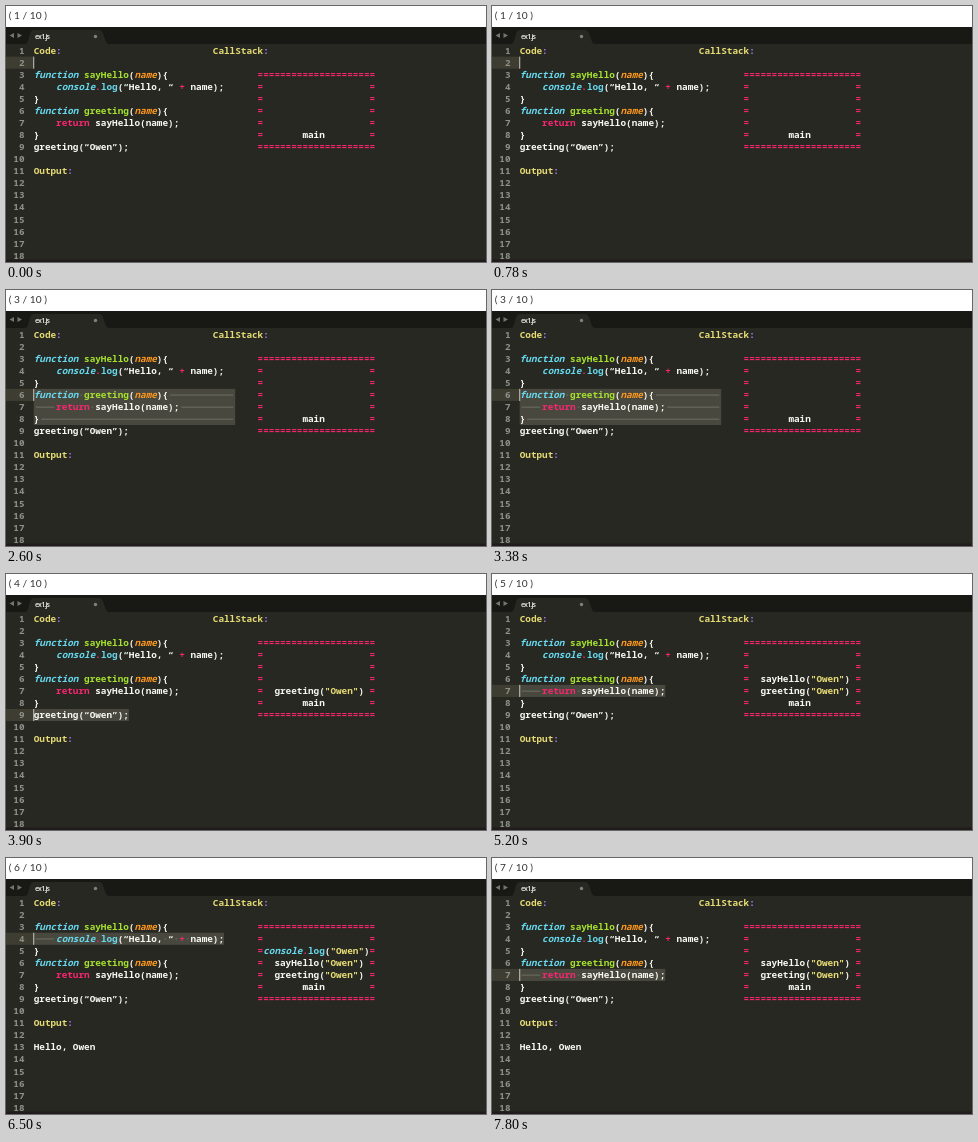
These frames come from a looping animation (480x256 px, 8 s). An HTML page:

```html
<!DOCTYPE html>
<html lang="en">
<head>
<meta charset="utf-8">
<title>Call stack</title>
<style>
  html, body { margin: 0; width: 100%; height: 100%; overflow: hidden; background: #272822; }
  svg { display: block; }
  text { white-space: pre; }
  .code { font: 600 9.33px "Noto Sans Mono", monospace; fill: #f8f8f2; }
  .num { fill: #8f908a; text-anchor: end; }
  .keyword { fill: #66d9ef; font-style: italic; }
  .method { fill: #66d9ef; }
  .define { fill: #a6e22e; }
  .param { fill: #fd971f; font-style: italic; }
  .op { fill: #f92672; }
  .colon { fill: #ae81ff; }
  .string { fill: #e6db74; }
  .count { font: 10.2px Lato, sans-serif; fill: #333; }
  .tab { font: 600 7px "Open Sans", sans-serif; fill: #f0f0ec; letter-spacing: -.8px; }
</style>
</head>
<body>
<svg width="480" height="256" viewBox="0 0 480 256">
  <rect width="480" height="256" fill="#272822"/>
  <rect width="480" height="21" fill="#fff"/>
  <rect y="21" width="480" height="17" fill="#181915"/>
  <path d="M19 38C24 38 22 24 28 24H93C99 24 98 38 103 38Z" fill="#272822"/>
  <path d="M8 27V32L3.500 29.500ZM11.500 27V32L16 29.500Z" fill="#74756f"/>
  <text class="tab" x="29" y="33">ex1.js</text>
  <circle cx="89.500" cy="30.500" r="1.700" fill="#80817b"/>
  <rect y="253.500" width="480" height="2.500" fill="#211c1b"/>
  <g id="live"></g>
  <g id="fixed"></g>
</svg>
<script>
const LEFT = 27.7, CELL = 5.598, LINE = 12.05, STEP = 1300, LOOP = 8000;
const x = col => LEFT + col * CELL;
const baseline = row => 47.8 + (row - 1) * LINE;
const rowTop = row => baseline(row) - 9.2;

const code = {
  1: "Code:", 3: "function sayHello(name){", 4: "    console.log(“Hello, “ + name);", 5: "}",
  6: "function greeting(name){", 7: "    return sayHello(name);", 8: "}",
  9: "greeting(“Owen”);", 11: "Output:"
};
const calls = ['  greeting("Owen")', '  sayHello("Owen")', 'console.log("Owen")'];

// selection: first row, last row, width in columns
const steps = [
  { depth: 0, select: [2, 2, 0] },
  { depth: 0, select: [3, 5, 36] },
  { depth: 0, select: [6, 8, 36] },
  { depth: 1, select: [9, 9, 17] },
  { depth: 2, select: [7, 7, 26] },
  { depth: 3, select: [4, 4, 34], output: true },
  { depth: 2, select: [7, 7, 26], output: true }
];

const tokens = new RegExp([
  "(?<keyword>function|console)", "(?<method>(?<=\\.)log)",
  "(?<define>(?<=function )\\w+)", "(?<param>(?<=function \\w+\\()name)",
  "(?<op>return|[=+]+|\\.(?=log))", "(?<colon>:)",
  '(?<string>"\\w+"|Code|CallStack|Output)'
].join("|"), "g");

function highlight(text) {
  return text.replace(tokens, (match, ...rest) => {
    const groups = rest.at(-1);
    const kind = Object.keys(groups).find(key => groups[key]);
    return `<tspan class="${kind}">${match}</tspan>`;
  });
}

const line = (row, col, text) =>
  `<text class="code" x="${x(col)}" y="${baseline(row)}">${highlight(text)}</text>`;

const rect = (left, y, width, height, fill) =>
  `<rect x="${left}" y="${y}" width="${width}" height="${height}" fill="${fill}"/>`;

function selection([first, last, width]) {
  const y = rowTop(first);
  let out = rect(0, y, x(0), LINE, "#3e3d32")
    + rect(x(0), y, width * CELL, (last - first + 1) * LINE, "#49483e")
    + rect(x(0) - .4, y, .9, LINE, "#d8d8d0");
  for (let row = first; row <= last; row++) {
    for (const gap of (code[row] || "").padEnd(width).matchAll(/ +/g)) {
      const span = (gap[0].length - .7) * CELL;
      out += rect(x(gap.index + .35), baseline(row) - 3.4, span, .8, "#77776c");
    }
  }
  return out;
}

function drawFixed() {
  let out = line(1, 32, "CallStack:") + line(8, 48, "main");
  for (let row = 1; row <= 18; row++) {
    out += `<text class="code num" x="18.5" y="${baseline(row)}">${row}</text>`;
    if (row === 3 || row === 9) out += line(row, 40, "=".repeat(21));
    if (row > 3 && row < 9) out += line(row, 40, "=") + line(row, 60, "=");
  }
  for (const row in code) out += line(row, 0, code[row]);
  return out;
}

function drawStep(index) {
  const { depth, select, output } = steps[index];
  let out = `<text class="count" x="2.7" y="12.8">( ${index + 1} / 10 )</text>` + selection(select);
  calls.slice(0, depth).forEach((call, i) => out += line(7 - i, 41, call));
  if (output) out += line(13, 0, "Hello, Owen");
  return out;
}

const live = document.getElementById("live");
document.getElementById("fixed").innerHTML = drawFixed();
let shown = -1;

function tick() {
  const index = Math.floor(performance.now() % LOOP / STEP);
  if (index !== shown) live.innerHTML = drawStep(shown = index);
  requestAnimationFrame(tick);
}
tick();
</script>
</body>
</html>
```
